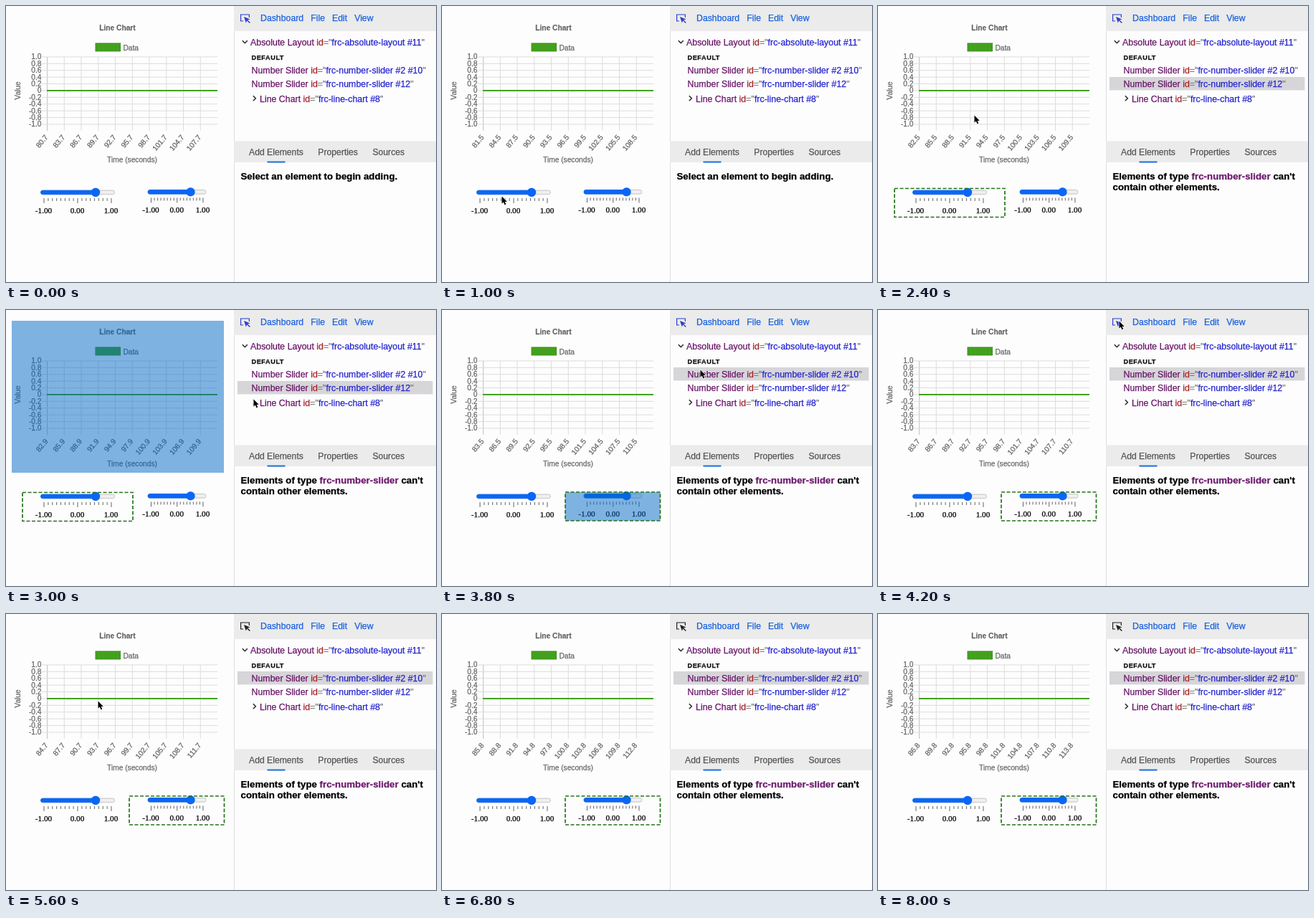
Recreate the animation shown at these times as an HTML page with a canvas. Size 600 px wide and 385 px high, loop 8200 ms.

```html
<!DOCTYPE html>
<html lang="en">
<head>
<meta charset="utf-8">
<title>Dashboard editor</title>
<style>
html, body { margin: 0; width: 100%; height: 100%; overflow: hidden; background: #fefdfe; }
canvas { display: block; }
</style>
</head>
<body>
<canvas id="stage" width="600" height="385"></canvas>
<script>
const ctx = document.getElementById('stage').getContext('2d');
const LOOP = 8200, STEP = 200;
const SANS = '"Liberation Sans", Arial, sans-serif';
const SERIF = '"Liberation Serif", Times, serif';
const PAGE = '#fefdfe', BAR = '#ebebeb', GREEN = '#43a11f', BLUE = '#0b66f5', GREY = '#666';
const BOLD = { weight: 'bold' };

// Each tree row knows its text, its baseline and the area it highlights.
const layout = { name: 'Absolute Layout', id: 'frc-absolute-layout #11', x: 341, y: 55, area: [0, 0, 318, 385] };
const right = { name: 'Number Slider', id: 'frc-number-slider #2 #10', x: 342.5, y: 94, area: [172, 254, 132.5, 40] };
const left = { name: 'Number Slider', id: 'frc-number-slider #12', x: 342.5, y: 113, area: [23, 254.5, 154, 40] };
const graph = { name: 'Line Chart', id: 'frc-line-chart #8', x: 354, y: 133.5, area: [8, 15, 296, 212] };
const rows = [layout, right, left, graph];

// Key points as [seconds, ...values]
const CLOCK = [[0, 80.7], [1, 81.53], [5.6, 84.7], [8, 86.8]];
const POINTER = [[1, 83, 265], [1.6, 83, 265], [2.4, 134, 152], [3, 345, 124],
  [3.4, 360, 83], [3.8, 360, 83], [4.2, 336, 15], [5.6, 128, 121]];

function sample(keys, t) {
  const i = keys.findIndex(k => k[0] >= t);
  if (i < 1) return keys.at(i).slice(1);
  const a = keys[i - 1], b = keys[i], p = (t - a[0]) / (b[0] - a[0]);
  return a.slice(1).map((v, j) => v + (b[j + 1] - v) * p);
}

function box(x, y, w, h, color) {
  ctx.fillStyle = color;
  ctx.fillRect(x, y, w, h);
}

function line(color, width, ...pts) {
  ctx.strokeStyle = color;
  ctx.lineWidth = width;
  ctx.beginPath();
  pts.forEach(([x, y]) => ctx.lineTo(x, y));
  ctx.stroke();
}

// Draws slightly thickened text and returns the x where it ends.
function text(str, x, y, size, color, { align = 'left', weight = '', family = SANS, base = 'alphabetic' } = {}) {
  ctx.font = `${weight} ${size}px ${family}`;
  ctx.textAlign = align;
  ctx.textBaseline = base;
  ctx.fillStyle = ctx.strokeStyle = color;
  ctx.lineWidth = 0.25;
  ctx.fillText(str, x, y);
  ctx.strokeText(str, x, y);
  return x + ctx.measureText(str).width;
}

function turned(str, x, y, degrees, align) {
  ctx.save();
  ctx.translate(x, y);
  ctx.rotate(degrees * Math.PI / 180);
  text(str, 0, 0, 10.2, GREY, { align, base: 'middle' });
  ctx.restore();
}

function chart(start) {
  text('Line Chart', 155.5, 33.5, 10.2, GREY, { align: 'center', weight: 'bold' });
  box(124.5, 51.5, 35.5, 12, '#3b931b');
  box(125.5, 52.5, 33.5, 10, GREEN);
  text('Data', 163.5, 61.5, 10.2, GREY);
  for (let i = 0; i <= 10; i++) {
    const x = 57.5 + i * 23.75, y = 71 + i * 9.4;
    line('#dcdcdc', 1, [50, y], [295, y]);
    text(i === 5 ? '0' : (1 - i / 5).toFixed(1), 49.5, y + 0.5, 10.2, GREY, { align: 'right', base: 'middle' });
    if (i === 10) break;
    line(i ? '#dcdcdc' : '#c4c4c4', 1, [x, 71], [x, 174]);
    turned((start + 3 * i).toFixed(1), x - 0.5, 181.5, -50, 'right');
  }
  line(GREEN, 2, [57, 118], [295, 118]);
  turned('Value', 17, 118, -90, 'center');
  text('Time (seconds)', 176, 218, 10.2, GREY, { align: 'center' });
}

function pill(x, y, w, fill, border) {
  ctx.beginPath();
  ctx.roundRect(x, y - 2.8, w, 5.6, 2.8);
  ctx.fillStyle = fill;
  ctx.fill();
  ctx.strokeStyle = border;
  ctx.lineWidth = 0.8;
  ctx.stroke();
}

function slider(x, y, w, thumb, scale) {
  pill(x, y, w, '#efefef', '#b8b8b8');
  pill(x, y, thumb - x, BLUE, BLUE);
  ctx.beginPath();
  ctx.arc(thumb, y, 6.2, 0, 7);
  ctx.fillStyle = BLUE;
  ctx.fill();
  for (let i = 0; i <= 16; i++) {
    const tx = x + 4.5 + scale * i / 16, major = i % 8 === 0;
    line('#707070', 1.1, [tx, y + 8], [tx, y + (major ? 15 : 12)]);
    if (major) text((i / 8 - 1).toFixed(2), tx - 0.5, y + 29, 11.2, '#000', { align: 'center', family: SERIF });
  }
}

function treeRow({ name, id, x, y }) {
  const parts = [[name + ' ', '#681568'], ['id', '#a3262a'], ['="', '#777'], [id, '#2424cf'], ['"', '#777']];
  for (const [str, color] of parts) x = text(str, x, y, 12.4, color);
}

function labels(words, x, y, size, gap, color) {
  for (const word of words) x = text(word, x, y, size, color) + gap;
}

function chevron(x, y, degrees) {
  ctx.save();
  ctx.translate(x, y);
  ctx.rotate(degrees * Math.PI / 180);
  line('#222', 1.4, [-1.8, -3.5], [1.8, 0], [-1.8, 3.5]);
  ctx.restore();
}

function pickIcon(color) {
  line(color, 1.2, [331, 21], [327.6, 21], [327.6, 12], [339.4, 12], [339.4, 16]);
  ctx.fillStyle = color;
  ctx.fill(new Path2D('M332 15L340.5 18.5L337.2 19.5L340.8 23L339.8 24L336.2 20.6L334.8 23.5Z'));
}

function panel(picking, selected) {
  box(318, 0, 282, 385, PAGE);
  line('#dedede', 1, [318.5, 0], [318.5, 385]);
  box(318, 0, 282, 35, BAR);
  box(318, 188.5, 282, 29.5, BAR);
  pickIcon(picking ? '#2b3fd0' : '#222');
  labels(['Dashboard', 'File', 'Edit', 'View'], 355, 21.2, 12.3, 10, '#1a62de');

  if (selected) box(323, selected.y - 14, 272.5, 18.5, '#d6d5d8');
  rows.forEach(treeRow);
  chevron(333.3, 50, 90);
  chevron(346.6, 128.8, 0);
  ctx.letterSpacing = '0.55px';
  text('DEFAULT', 342.5, 75, 9.2, '#111', BOLD);
  ctx.letterSpacing = '0px';

  labels(['Add Elements', 'Properties', 'Sources'], 339, 207.5, 12.2, 20.5, '#555');
  box(364.5, 216.6, 25, 2, '#1a6fe0');
  if (!selected) {
    text('Select an element to begin adding.', 327.5, 242, 13.3, '#000', BOLD);
    return;
  }
  let x = text('Elements of type ', 327.5, 242, 13.3, '#000', BOLD);
  x = text('frc-number-slider', x, 242, 13.3, '#6d1a6d', BOLD);
  text(" can't", x, 242, 13.3, '#000', BOLD);
  text('contain other elements.', 327.5, 257, 13.3, '#000', BOLD);
}

function pointer(x, y) {
  ctx.save();
  ctx.translate(x + 0.5, y + 0.5);
  ctx.scale(0.85, 0.85);
  const shape = new Path2D('M0 0V12L2.7 9.5L4.7 14L6.8 13L4.9 8.7H8.6Z');
  ctx.strokeStyle = '#fff';
  ctx.lineWidth = 1.8;
  ctx.stroke(shape);
  ctx.fillStyle = '#000';
  ctx.fill(shape);
  ctx.restore();
}

function draw(now) {
  const t = Math.floor(now % LOOP / STEP) * STEP / 1000;
  const [px, py] = sample(POINTER, t);
  const selected = t < 1.6 ? null : t < 3.6 ? left : right;
  const hovered = px > 323 && rows.find(r => py >= r.y - 14 && py < r.y + 5);

  box(0, 0, 600, 385, PAGE);
  chart(sample(CLOCK, t)[0]);
  slider(48.5, 260, 103, 125, 94);
  slider(198, 259.4, 81, 257.5, 72.5);
  if (hovered) box(...hovered.area, 'rgba(0, 104, 198, 0.5)');
  if (selected) {
    ctx.setLineDash([5, 2.5]);
    ctx.strokeStyle = '#24741a';
    ctx.lineWidth = 1.7;
    ctx.strokeRect(...selected.area);
    ctx.setLineDash([]);
  }
  panel(t <= 4.2, selected);
  if (t >= 0.8 && t <= 6) pointer(px, py);
}

const begin = performance.now();
function tick() {
  draw(performance.now() - begin);
  requestAnimationFrame(tick);
}
tick();
</script>
</body>
</html>
```
